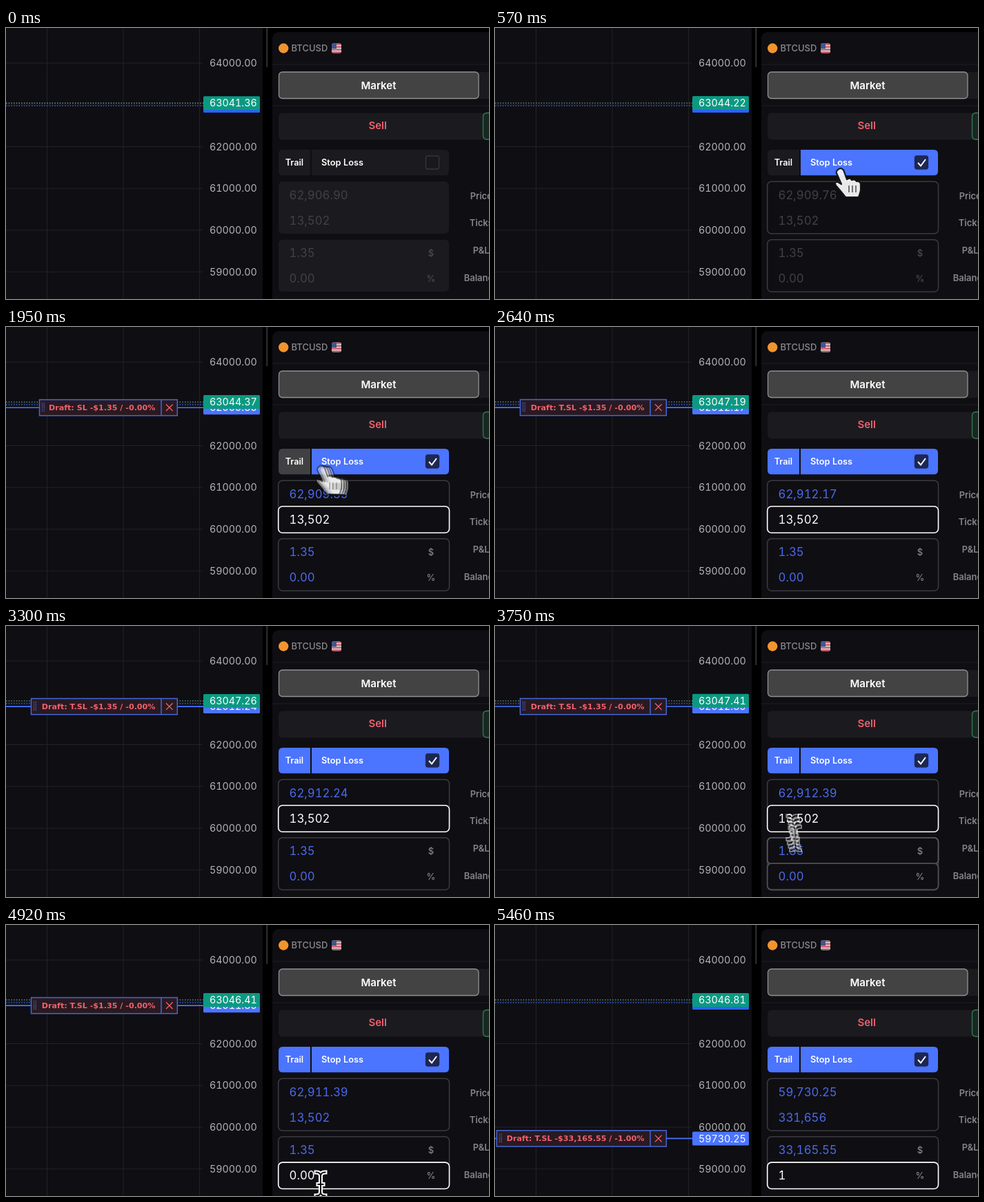
An HTML page that plays this animation: 700x394 px, repeating every 5.49 s.

```html
<!DOCTYPE html>
<html lang="en">
<head>
<meta charset="utf-8">
<title>Trailing stop order</title>
<style>
  html, body { margin: 0; width: 100%; height: 100%; overflow: hidden; background: #000; }
  svg { display: block; width: 700px; height: 394px; }
  text { font-family: Inter, sans-serif; font-variant-numeric: tabular-nums; white-space: pre; }
  .draft { font-family: "DejaVu Sans", sans-serif; font-weight: 700; }
</style>
</head>
<body>
<svg id="stage" viewBox="0 0 700 394"></svg>
<script>
const LOOP = 5490;
const BG = '#0f0e13', CARD = '#1b1b1f', BLUE = '#4b74ff', VALUE = '#4b6bea', RED = '#f0616d';

// Moments at which the interface changes
const T = { on: 510, values: 640, trailHover: 1860, trail: 2220,
  pnlHover: 3650, balanceHover: 3700, balance: 4650, typed: 5040, result: 5220 };

const quotes = [[0, 63041.36], [960, 63049.94], [1890, 63044.37], [2580, 63047.19],
  [3690, 63047.41], [4380, 63046.21], [5400, 63046.81], [LOOP, 63046.81]];

const moves = [
  { start: 120, end: 430, gone: 680, a: [570, 290], b: [500, 205] },
  { start: 1780, end: 2120, gone: 2400, a: [500, 208], b: [424, 198] },
  { start: 3520, end: 3980, gone: 5040, a: [410, 223], b: [456, 375] },
];

const clamp = v => Math.max(0, Math.min(1, v));
const ease = u => u * u * (3 - 2 * u);
const priceY = p => 51 + (64000 - p) * 0.06075;
const group = v => v.toLocaleString('en-US', { minimumFractionDigits: 2, maximumFractionDigits: 2 });

const rect = (x, y, w, h, fill, r = 0, stroke = 'none', sw = 1.3) =>
  `<rect x="${x}" y="${y}" width="${w}" height="${h}" rx="${r}" fill="${fill}" stroke="${stroke}" stroke-width="${sw}"/>`;
const path = (d, stroke, sw = 1, extra = 'fill="none"') =>
  `<path d="${d}" stroke="${stroke}" stroke-width="${sw}" ${extra}/>`;
const text = (x, cy, str, size, fill, weight = 400, anchor = 'start', cls = '') =>
  `<text x="${x}" y="${cy + size * 0.364}" font-size="${size}" fill="${fill}" font-weight="${weight}" text-anchor="${anchor}" class="${cls}">${str}</text>`;

function quote(t) {
  const i = quotes.findIndex((q, k) => k && t < q[0]) - 1;
  const [[t0, p0], [t1, p1]] = [quotes[i], quotes[i + 1]];
  return p0 + (p1 - p0) * Math.floor((t - t0) / (t1 - t0) * 3) / 3;
}

function tag(p, fill, label) {
  const y = priceY(p);
  return rect(286, y - 10, 82, 20, fill, 1.5) + (label ? text(295, y, p.toFixed(2), 14.3, '#fff') : '');
}

function draft(stop, trail, result) {
  const y = priceY(stop), left = result ? 2.5 : trail ? 36.5 : 48.5;
  const label = `Draft: ${trail ? 'T.' : ''}SL -$${result ? '33,165.55 / -1.00%' : '1.35 / -0.00%'}`;
  return path(`M0 ${y}H286`, BLUE, 1.6)
    + rect(left, y - 11.6, 248.3 - left, 23.2, '#291a22', 0, '#4467d8', 1.5)
    + path(`M225 ${y - 11.6}v23.2`, '#4467d8', 1.5)
    + path(`M${left + 4} ${y - 7}v14M${left + 6.8} ${y - 7}v14`, '#4467d8', 1.4, 'stroke-dasharray="1.4 1.4"')
    + text(216.5, y - 0.4, label, 11.13, RED, 700, 'end', 'draft')
    + path(`M232 ${y - 4.8}l9.6 9.6m0 -9.6l-9.6 9.6`, RED, 1.3);
}

function chart(t, price, stop) {
  let s = rect(0, 0, 372, 394, BG);
  s += path('M59.5 0V394M170 0V394M280.5 0V394', '#222226');
  for (let p = 64000; p >= 59000; p -= 1000) {
    s += path(`M0 ${priceY(p)}H285`, '#222226');
    if (p !== 63000) s += text(295, priceY(p), p.toFixed(2), 14.3, '#b4b4b8');
  }
  const dots = 'fill="none" stroke-dasharray="1.5 2.2"';
  s += path(`M0 ${priceY(price)}H286`, '#62a898', 1.3, dots);
  s += path('M0 113H286', '#315fe0', 1.3, dots);
  s += tag(62979.5, '#2962ff');
  if (t >= T.values) s += draft(stop, t >= T.trail, t >= T.result) + tag(stop, BLUE, true);
  return s + tag(price, '#0b9981', true);
}

function flag() {
  let s = '<clipPath id="flag"><rect x="472" y="22.5" width="14" height="14" rx="2.5"/></clipPath><g clip-path="url(#flag)">';
  s += rect(471, 22, 16, 15, '#d5cdd2');
  for (let i = 0; i < 4; i++) s += rect(471, 22.5 + i * 4, 16, 2, '#c44f5a');
  return s + rect(471, 22, 8, 8, '#3f568f') + '</g>';
}

function header() {
  return rect(377, -3, 2.5, 60, '#29292c', 1)
    + rect(386, 6, 340, 420, BG, 9)
    + '<circle cx="402.2" cy="29.5" r="7.2" fill="#f2942e"/>'
    + text(413.5, 29.5, 'BTCUSD', 13, '#8b8b8f', 500) + flag()
    + path('M386 53H700M386 113H700', '#1e1e22')
    + rect(395, 64, 330, 39, CARD, 6)
    + rect(395.5, 64, 289.5, 38.5, '#434344', 5, '#919193')
    + text(540, 83.3, 'Market', 15, '#fff', 600, 'middle')
    + rect(395, 123.5, 330, 39, CARD, 6)
    + text(538.7, 142, 'Sell', 15, RED, 600, 'middle')
    + rect(691.5, 123.5, 60, 38.5, '#16281f', 5, '#377a58')
    + [['Price', 244], ['Ticks', 283.5], ['P&amp;L', 323.5], ['Balance', 363.5]]
      .map(([s, y]) => text(688.7, y, s, 12.9, '#86868a', 600, 'middle')).join('');
}

function toggles(t) {
  const on = t >= T.on, hover = t >= T.trailHover;
  const trailFill = t >= T.trail ? BLUE : hover ? '#414143' : CARD;
  let s = `<path d="M441 177H401q-6 0 -6 6V208.3q0 6 6 6H441Z" fill="${trailFill}"/>`
    + `<path d="M443 177H636q6 0 6 6V208.3q0 6 -6 6H443Z" fill="${on ? BLUE : CARD}"/>`
    + text(404.7, 195.6, 'Trail', 12.7, '#fff', 600) + text(457, 195.6, 'Stop Loss', 12.8, '#fff', 600)
    + rect(608.5, 186, 19, 19, on ? '#1d2752' : '#19191c', 3, on ? '#1d2752' : '#36363b');
  return on ? s + path('M613 196l4 4.5l7 -9.5', '#fff', 2) : s;
}

function fields(t, stop) {
  const on = t >= T.on, live = t >= T.values, result = t >= T.result;
  const focus = !live ? -1 : t < T.balance ? 1 : 3;
  const values = [group(stop), result ? '331,656' : '13,502', result ? '33,165.55' : '1.35',
    t >= T.typed ? '1' : '0.00'];
  const rows = [242.5, 280, 327, 364.3];
  const cell = (i, stroke, sw) => rect(394.7, rows[i] - 19.2, 247.8, 38.4, BG, 6, stroke, sw);

  let s = [223.3, 307.7].map(y => on
    ? rect(394.7, y, 247.8, 75.8, BG, 6, '#3b3b40', 1.5)
    : rect(395, y, 247, 75.6, CARD, 6)).join('');
  if (t >= T.pnlHover && t < 3850) s += cell(2, '#5a5a5e', 1.8);
  if (t >= T.balanceHover && t < T.balance) s += cell(3, t < 3850 ? '#505054' : '#77777b', 1.8);
  if (focus >= 0) s += cell(focus, '#fff', 1.6);

  values.forEach((v, i) => {
    s += text(410.5, rows[i], v, 16.8, i === focus ? '#fff' : live ? VALUE : '#424246');
  });
  const unit = live ? '#86868a' : '#4c4c50';
  return s + text(616, rows[2], '$', 13, unit, 500, 'middle') + text(616, rows[3], '%', 13, unit, 500, 'middle');
}

function pointer(x, y, opacity) {
  const hand = 'M-3 1C1 -3 5 0 6 4L10 15Q15 12 17 16Q22 14 24 18Q29 17 30 22V31Q29 36 27 41H8Q2 33 -6 24Q-9 18 -3 19L2 22L-5 6Q-6 3 -3 1Z';
  const beam = 'M-6.5 -15.5Q0 -15.5 0 -10Q0 -15.5 6.5 -15.5M0 -10V13M-3.5 2H3.5M-6.5 18.5Q0 18.5 0 13Q0 18.5 6.5 18.5';
  const round = 'fill="none" stroke-linecap="square"';
  const shape = y > 224
    ? path(beam, '#fff', 6, round) + path(beam, '#111', 2, round)
    : path(hand, '#151515', 2.2, 'fill="#fff" stroke-linejoin="round"') + path('M13 24v10M18 24v10M23 24v10', '#555', 1.5);
  return `<g transform="translate(${x} ${y})" opacity="${opacity}">${shape}</g>`;
}

function cursor(t) {
  const m = moves.find(m => t >= m.start && t < m.gone);
  if (!m) return '';
  const alpha = Math.min(clamp((t - m.start) / 90), clamp((m.gone - t) / 120));
  const at = (time, opacity) => {
    const u = ease(clamp((time - m.start) / (m.end - m.start)));
    return pointer(m.a[0] + (m.b[0] - m.a[0]) * u, m.a[1] + (m.b[1] - m.a[1]) * u, opacity);
  };
  // Motion blur while travelling
  return t < m.end ? [-16, -5, 5, 16].map(d => at(t + d, alpha * 0.45)).join('') : at(t, alpha);
}

const stage = document.getElementById('stage');
function draw() {
  const t = performance.now() % LOOP;
  const price = quote(t);
  const stop = price - (t >= T.result ? 3316.56 : t >= T.values ? 135.02 : 134.46);
  stage.innerHTML = chart(t, price, stop) + header() + toggles(t) + fields(t, stop) + cursor(t);
  requestAnimationFrame(draw);
}
draw();
</script>
</body>
</html>
```
